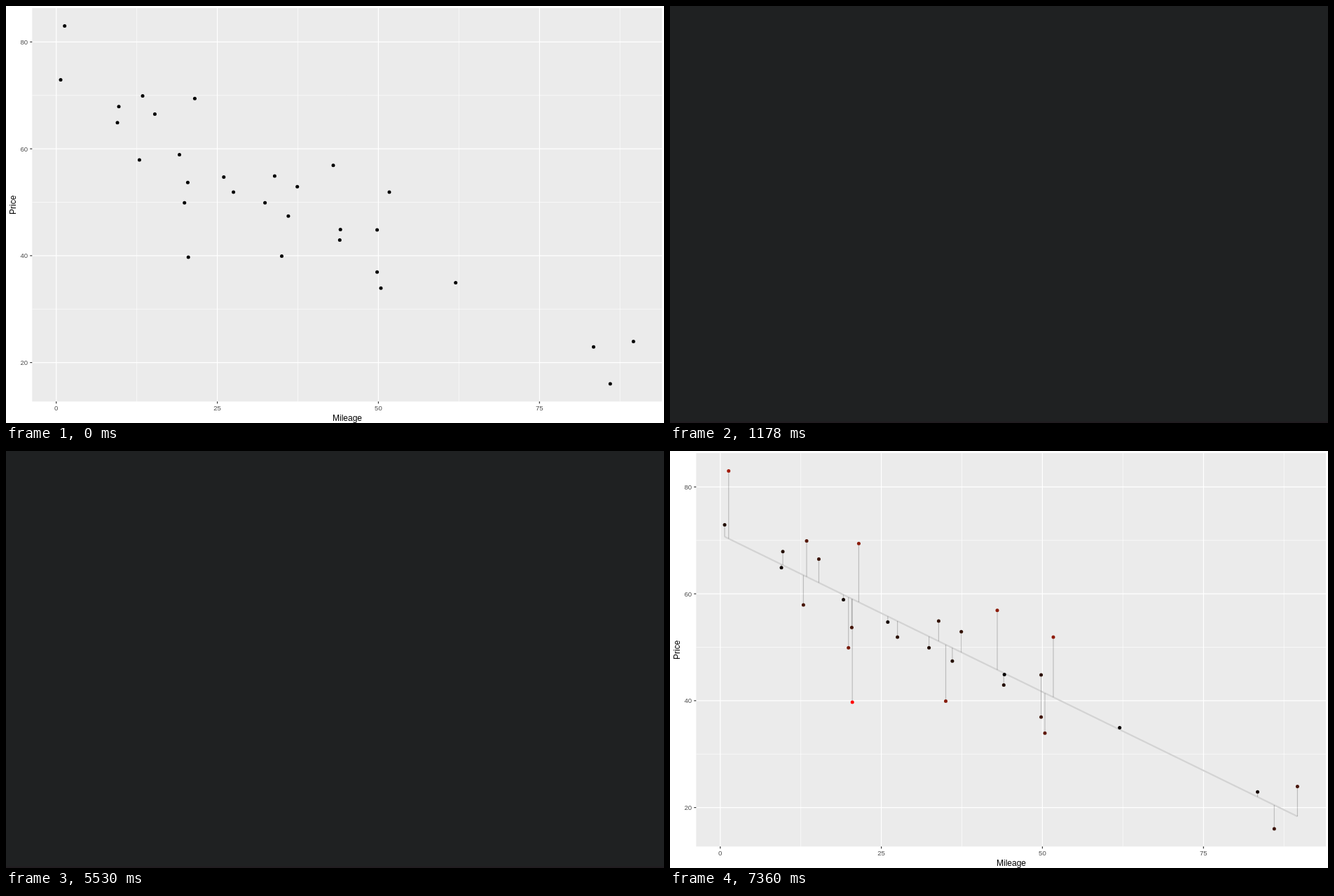
Animation of 939 by 596 pixels, one loop 8000 ms. Source, as an HTML page with a canvas:

```html
<!DOCTYPE html>
<html lang="en">
<head>
<meta charset="utf-8">
<title>Price by mileage</title>
<style>
html, body { margin: 0; overflow: hidden; background: #fff; }
canvas { display: block; }
</style>
</head>
<body>
<canvas id="stage" width="939" height="596"></canvas>
<script>
const ctx = document.getElementById('stage').getContext('2d');
const FONT = '"Liberation Sans", Arial, sans-serif';
const LOOP = 8000;
// Start time and kind of each scene
const SCENES = [[0, 'points'], [500, 'blank'], [1630, 'fit'], [5530, 'blank'], [6400, 'residuals']];
const PANEL = { left: 37.3, top: 3, right: 936, bottom: 565.3 };

// Point centres in stage pixels
const POINTS = [
  [83.7, 28.5], [78, 105.5], [161, 143.8], [159, 166.7], [195, 128.5], [212.4, 154.5],
  [269.4, 132.3], [190.4, 220], [247.5, 212.4], [259.4, 252.2], [254.7, 281.2], [260.2, 359],
  [310.8, 244.4], [324.6, 265.9], [383.4, 243], [415.7, 258.2], [369.6, 281.2], [402.9, 300.2],
  [393.5, 357.4], [467, 227.7], [547, 265.9], [477.2, 319.4], [476.3, 334.6], [529.6, 320.1],
  [529.6, 380.3], [535, 403.3], [641.7, 395.6], [838.5, 487.2], [895.4, 479.5], [862.3, 540]
];
const X0 = 78, X1 = 895.4;
const xPix = v => 71.7 + v * 9.195;
const yPix = v => 662.3 - v * 7.636;
const fitY = x => 122.5 + (x - X0) * (522.2 - 122.5) / (X1 - X0);
const residual = ([x, y]) => Math.abs(y - fitY(x));
const maxResidual = Math.max(...POINTS.map(residual));

function line(x1, y1, x2, y2, color, width) {
  ctx.strokeStyle = color;
  ctx.lineWidth = width;
  ctx.beginPath();
  ctx.moveTo(x1, y1);
  ctx.lineTo(x2, y2);
  ctx.stroke();
}

function text(str, x, y, size, color, align) {
  ctx.font = `${size}px ${FONT}`;
  ctx.fillStyle = color;
  ctx.textAlign = align;
  ctx.fillText(str, x, y);
}

function gridX(v, width) {
  line(xPix(v), PANEL.top, xPix(v), PANEL.bottom, '#fff', width);
}

function gridY(v, width) {
  line(PANEL.left, yPix(v), PANEL.right, yPix(v), '#fff', width);
}

function drawAxes() {
  const { left, top, right, bottom } = PANEL;
  ctx.fillStyle = '#fff';
  ctx.fillRect(0, 0, 939, 596);
  ctx.fillStyle = '#ebebeb';
  ctx.fillRect(left, top, right - left, bottom - top);
  [12.5, 37.5, 62.5, 87.5].forEach(v => gridX(v, 0.6));
  [30, 50, 70].forEach(v => gridY(v, 0.6));
  for (const v of [0, 25, 50, 75]) {
    gridX(v, 1.2);
    line(xPix(v), bottom, xPix(v), bottom + 3, '#333', 1.2);
    text(v, xPix(v), 578, 9.6, '#4d4d4d', 'center');
  }
  for (const v of [20, 40, 60, 80]) {
    gridY(v, 1.2);
    line(left - 3, yPix(v), left, yPix(v), '#333', 1.2);
    text(v, 31.2, yPix(v) + 3.5, 9.6, '#4d4d4d', 'right');
  }
  text('Mileage', 487, 593, 12, '#000', 'center');
  ctx.save();
  ctx.translate(13.5, 284.3);
  ctx.rotate(-Math.PI / 2);
  text('Price', 0, 0, 12, '#000', 'center');
  ctx.restore();
}

function drawPoints(colored) {
  for (const p of POINTS) {
    const t = colored ? residual(p) / maxResidual : 0;
    ctx.fillStyle = '#000';
    // Black to red, blended in Lab space
    if (t) ctx.fillStyle = `lab(${54.29 * t}% ${80.8 * t} ${69.9 * t})`;
    ctx.beginPath();
    ctx.arc(...p, 2.5, 0, 2 * Math.PI);
    ctx.fill();
  }
}

function drawBlank() {
  ctx.fillStyle = '#1f2122';
  ctx.fillRect(0, 0, 939, 596);
  ctx.fillStyle = '#211c20';
  ctx.fillRect(0, 594, 939, 2);
}

function draw(scene) {
  if (scene === 'blank') return drawBlank();
  drawAxes();
  const colored = scene === 'residuals';
  if (scene !== 'points') line(X0, fitY(X0), X1, fitY(X1), '#d3d3d3', 2.3);
  if (colored) {
    for (const [x, y] of POINTS) line(x, y, x, fitY(x), 'rgba(0,0,0,.2)', 1.2);
  }
  drawPoints(colored);
}

function tick() {
  const time = performance.now() % LOOP;
  draw(SCENES.findLast(([start]) => start <= time)[1]);
  requestAnimationFrame(tick);
}
tick();
</script>
</body>
</html>
```
